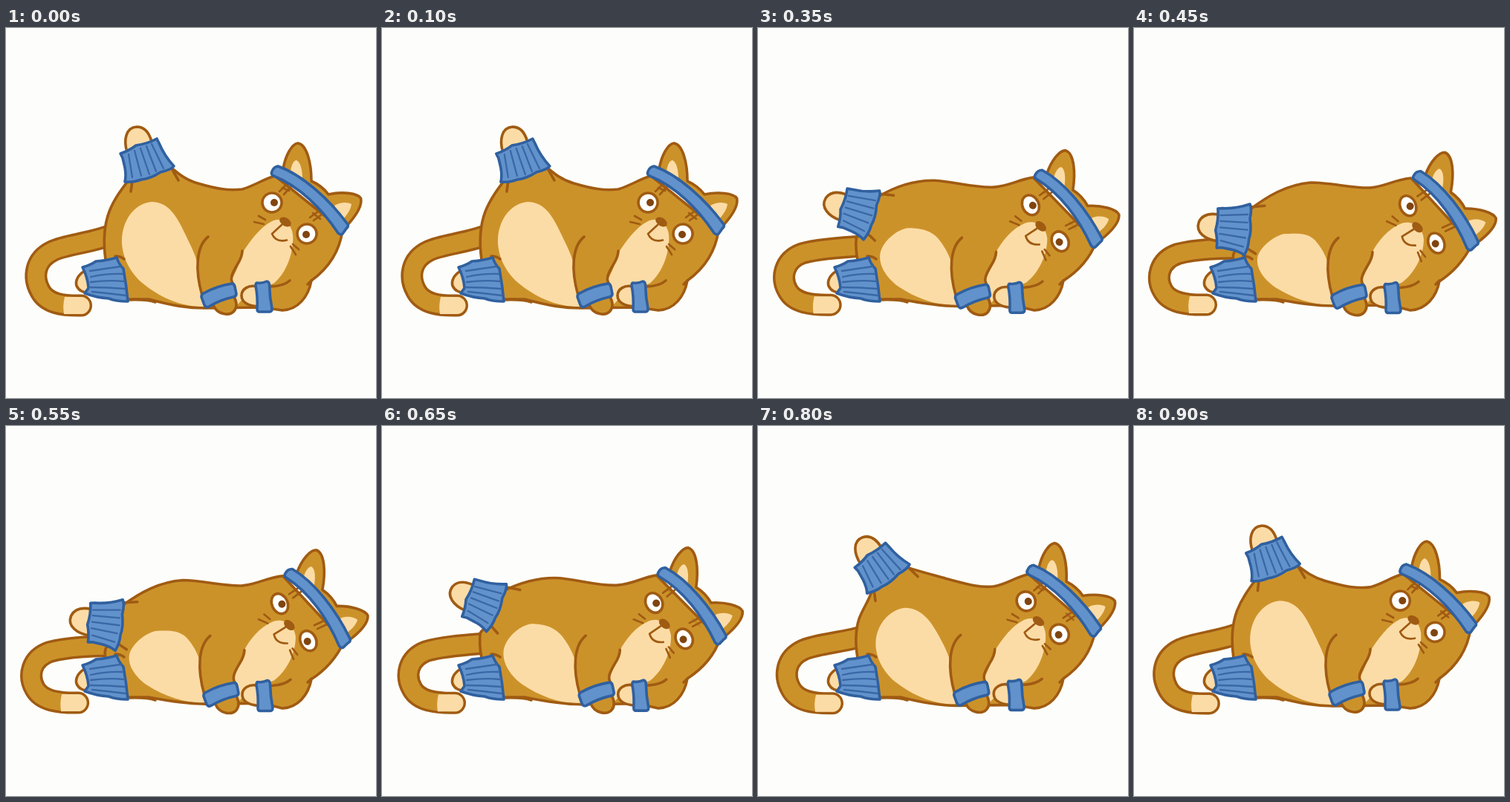
An HTML page that plays this animation: 498x498 px, repeating every 0.95 s.

```html
<!DOCTYPE html>
<html lang="en">
<head>
<meta charset="utf-8">
<title>Cat workout</title>
<style>
  html, body { margin: 0; width: 100%; height: 100%; overflow: hidden; background: #fdfefb; }
  svg { display: block; width: 100vw; height: 100vh; fill: none; stroke-linecap: round; stroke-linejoin: round; }
  .line { stroke: #a05b12; stroke-width: 3.6; }
  .thin { stroke: #a05b12; stroke-width: 2.7; }
  .fur { fill: #cc922a; }
  .cream { fill: #fcdca6; }
  .blue { fill: #6292cb; stroke: #30609f; stroke-width: 3.6; }
  .rib { stroke: #3a68a6; stroke-width: 2.3; }
  .white { fill: #fff; }
  .pupil { fill: #80450f; }
  .nose { fill: #a05b12; }
  .tail-edge { stroke: #a05b12; stroke-width: 30; }
  .tail-fur { stroke: #cc922a; stroke-width: 23; }
</style>
</head>
<body>
<svg viewBox="0 0 498 498">
  <defs>
    <path id="tail"/>
    <path id="body"/>
  </defs>

  <use href="#tail" class="tail-edge"/>
  <use href="#tail" class="tail-fur"/>
  <path id="tip" class="cream" d="M79 362H101A11.5 11.5 0 0 1 101 385H78Q76 374 79 362Z"/>

  <path class="cream line" d="M106 327C97 332 93 340 95 347C98 354 104 356 114 357"/>
  <use href="#body" class="fur"/>
  <path id="belly" class="cream"/>
  <path id="chest" class="cream"/>
  <use href="#body" class="line"/>
  <path class="line" d="M164 366Q190 365 201 369M147 307Q154 307 159 311M411 340L406 345"/>

  <g id="leg">
    <path class="line" d="M170 206L168 220M223 189L232 205"/>
    <path class="cream line" d="M163 167C158 151 161 134 176 133C187 133 193 142 196 153"/>
    <path class="blue" d="M154 169Q166 165 175 158Q190 156 203 149L206 155Q213 172 226 186Q222 191 208 194Q194 203 182 204Q172 208 160 207Q162 199 160 188L157 175Z"/>
    <path class="rib" d="M165 170L170 201M173 165L182 199M181 162L193 197M189 159L202 193M196 156L212 189"/>
  </g>

  <path class="blue" d="M103 322Q114 319 121 314Q136 313 149 309Q152 318 158 324Q162 346 164 368Q148 368 138 364Q122 363 106 357L111 350Q110 336 103 322Z"/>
  <path class="rib" d="M113 327L154 321M114 335Q136 330 157 331M114 342Q138 339 159 341M114 349Q138 349 160 351M116 355Q138 357 161 360"/>

  <g id="head">
    <path class="fur line" d="M373 190C376 171 385 156 393 155C405 157 411 182 411 206C420 210 428 216 434 224C452 220 473 222 477.5 229C480 239 470 254 458 267"/>
    <path class="cream" d="M383 196C383 186 387 178 391 178C397 181 399 193 399 203ZM442 239C450 234 460 234 465 237C464 245 458 253 452 259Z"/>
    <path class="thin" d="M368 220L378 210M374 224L384 213M409 255L420 247M414 259L425 251"/>
    <path id="cross" class="thin" d="M372 215L381 219M413 249L423 257"/>
    <path class="blue" d="M358 193Q360 187 366 186C400 198 436 232 459 263Q462 267 458 270L453 277Q450 279 447 276C425 243 395 213 360 199Q356 197 358 193Z"/>
    <ellipse class="eye white line" cx="358" cy="235" transform="rotate(-35 358 235)"/>
    <ellipse class="eye white line" cx="405" cy="277" transform="rotate(-35 405 277)"/>
    <circle class="pupil" cx="361" cy="235" r="5"/>
    <circle class="pupil" cx="404" cy="278" r="5"/>
    <ellipse class="nose" cx="376" cy="261" rx="8.5" ry="5.5" transform="rotate(32 376 261)"/>
    <path class="thin" d="M371 265L358 277Q363 289 378 285.500M340 253L349 258M334 261L347 264M386 291L394 298M383 294L390 305"/>
  </g>

  <g id="paw">
    <path class="cream line" d="M338 348C326 345 317 352 317 360C317 370 328 374 339 375"/>
    <path class="line" d="M357 348Q374 347 382 340"/>
    <path class="blue" d="M338 343Q345 344 351 341Q354 341 354.500 346Q355 363 358 378Q358 382 354 382L341 382Q338 382 338 378Q339 362 336 347Q336 343 338 343Z"/>
  </g>

  <g id="arm">
    <path class="fur" d="M272 281C256 294 254 325 264 360L306 346C300 340 304 332 317 307Z"/>
    <path class="line" d="M272 281C256 294 254 325 264 360M318 300Q318 308 311 319C304 331 300 339 307 346"/>
    <path class="fur line" d="M279 373C284 386 301 388 307 381C312 375 310 367 306 360"/>
    <path class="blue" d="M266 357Q284 347 304 344Q307 344 308 348L310 358Q310 361 306 362Q288 366 273 375Q269 377 267 373L263 362Q263 358 266 357Z"/>
  </g>
</svg>
<script>
  const LOOP = 950, STEP = 50;
  const $ = id => document.getElementById(id);
  const eyes = document.querySelectorAll(".eye");

  // Closing part of the body outline, resting on the floor at height y.
  const floor = y => `C407 362 393 379 372 380L345 ${y - 1}L268 ${y}C245 ${y} 225 ${y - 3} 192 365L164 365L140 340Z`;

  // Each shape is a list of [lowering, path]; 0 = leg up, 1 = leg down.
  const shapes = {
    tail: [
      [0, "M145 277C118 289 82 291 63 300C38 312 36 336 46 354C55 371 76 374 101 373.5"],
      [1, "M145 297C118 296 82 298 59 304C33 313 29 337 39 354C48 370 70 373 97 372.5"]
    ],
    belly: [
      [0, "M196 234C220 234 231 256 241 277C252 300 262 318 262 345L268 375C235 376 206 362 182 342C163 325 155 302 156 283C158 255 175 236 196 234"],
      [1, "M203 277C214 277 232 274 243 285C256 299 265 318 265 345L268 373C240 373 214 364 190 349C172 336 165 322 166 311C167 297 188 279 203 277"]
    ],
    chest: [
      [0, "M318 303C328 287 342 268 358 260C372 254 384 262 386 278C388 300 378 330 360 344L330 352L312 372L302 342C308 332 314 318 318 303"],
      [1, "M320 303C328 287 342 270 360 263C376 258 389 270 390 284C390 308 376 332 360 343L330 352L312 372L304 342C310 332 316 318 320 303"]
    ],
    body: [
      [0, "M134 312C131 290 131 268 139 247C146 229 157 215 170 198L218 184C232 196 241 204 258 209C285 217 300 219 318 217C335 212 345 204 362 199L453 272C449 300 436 322 411 340" + floor(377)],
      [.42, "M134 312C131 297 130 283 134 268C138 256 145 248 143 235L184 193C213 197 232 198 250 203C275 209 298 218 318 215C335 213 345 204 366 200L454 280C449 302 436 323 411 340" + floor(376)],
      [.8, "M134 312C132 302 131 292 132 280C135 276 140 275 142 272L161 226C186 211 212 204 238 205C265 207 295 216 318 214C340 212 350 204 370 201L455 288C449 304 436 324 411 340" + floor(374.5)],
      [1, "M134 312C133 308 133 305 135 302C139 297 144 292 146 290L155 245C180 226 205 211 238 208C265 208 295 216 318 215C340 213 350 204 373 202L455 291C448 305 436 325 411 341" + floor(374)]
    ]
  };

  const ease = x => (1 - Math.cos(Math.PI * Math.min(1, Math.max(0, x)))) / 2;
  const lowering = t => t < 475 ? ease((t - 90) / 360) : 1 - ease((t - 500) / 450);

  function morph(poses, p) {
    let i = 1;
    while (i < poses.length - 1 && p > poses[i][0]) i++;
    const [a, from] = poses[i - 1], [b, to] = poses[i];
    const k = (p - a) / (b - a), ends = to.match(/[\d.]+/g);
    let n = 0;
    return from.replace(/[\d.]+/g, v => (+v + (ends[n++] - v) * k).toFixed(2));
  }

  const move = (id, value) => $(id).setAttribute("transform", value);

  function draw(p) {
    for (const id in shapes) $(id).setAttribute("d", morph(shapes[id], p));
    const lift = 18 * p * (1 - p);
    move("tip", `translate(${-4 * p} ${-p})`);
    move("leg", `translate(${8 * p} ${3 * p - lift}) rotate(${-66 * p} 224 270)`);
    move("head", `rotate(${11 * p} 341 293)`);
    move("arm", `translate(${3 * p} ${1.5 * p})`);
    move("paw", `translate(${p} ${1.5 * p})`);
    $("cross").style.opacity = 1 - p;
    for (const eye of eyes) {
      eye.setAttribute("rx", 13 - 2.5 * p);
      eye.setAttribute("ry", 13 + p);
    }
  }

  const start = performance.now();
  function tick() {
    const t = (performance.now() - start) % LOOP;
    draw(lowering(Math.floor(t / STEP) * STEP));
    requestAnimationFrame(tick);
  }
  tick();
</script>
</body>
</html>
```
